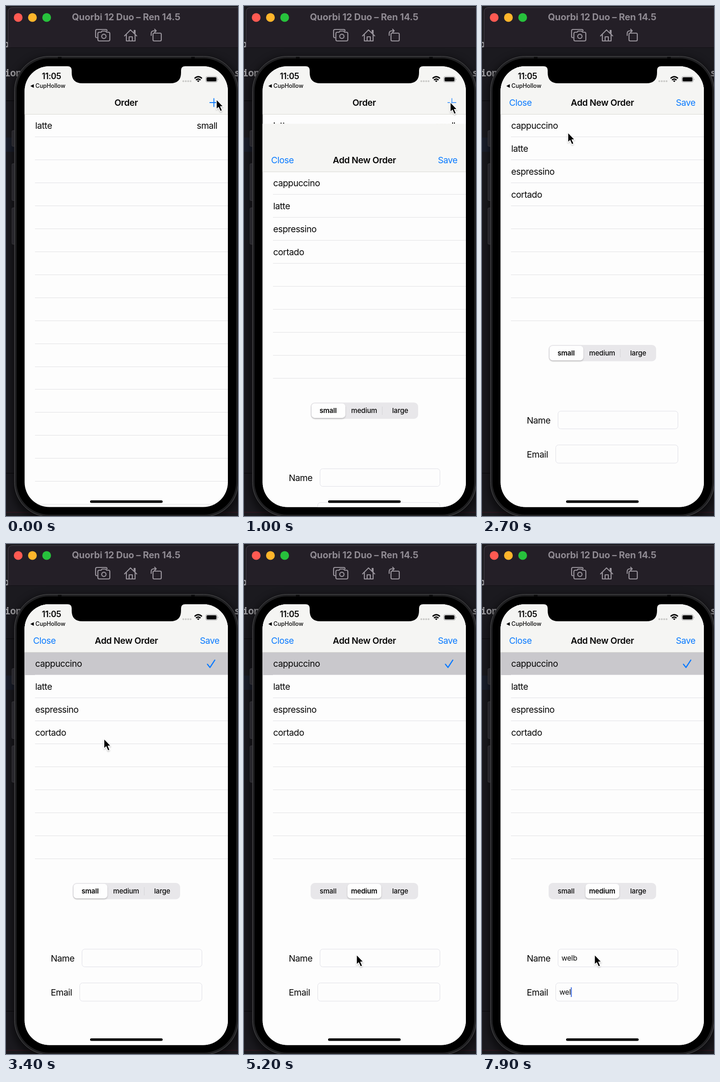
An HTML page for the animation above (8000 ms loop, 505 by 1109 pixels).

```html
<!DOCTYPE html>
<html lang="en">
<head>
<meta charset="utf-8">
<title>Order form</title>
<style>
html, body { margin: 0; width: 100%; height: 100%; overflow: hidden; background: #1b1a1f; }
svg { display: block; width: 505px; height: 1109px; }
text { font: 400 19.3px Inter, sans-serif; letter-spacing: -.5px; fill: #060606; }
.bold { font-weight: 600; letter-spacing: -.4px; }
.mid { text-anchor: middle; }
.end { text-anchor: end; }
.blue { fill: #0a7aff; }
.code { font: 600 21px "Noto Sans Mono", monospace; fill: #9a999d; }
.title { font: 700 20px Inter, sans-serif; letter-spacing: -.1px; fill: #8f8a92; }
.time { font-size: 18px; }
.back { font-size: 12.5px; font-weight: 500; letter-spacing: 0; }
.seg { font-size: 15px; font-weight: 500; letter-spacing: -.2px; }
.seg.on { font-weight: 600; }
.input { font-size: 15.7px; letter-spacing: -.2px; }
.rule { stroke: #e1e1e4; stroke-width: 1; }
.field { fill: #fdfdfd; stroke: #dfdfe6; stroke-width: 1; }
.icon { fill: none; stroke: #99949c; stroke-width: 2.2; stroke-linejoin: round; stroke-linecap: round; }
</style>
</head>
<body>
<svg viewBox="0 0 505 1109">
  <defs>
    <clipPath id="screen"><rect x="40.5" y="131" width="442.5" height="958.5" rx="54"/></clipPath>
    <filter id="soft" x="-30%" y="-30%" width="160%" height="160%">
      <feDropShadow dx="0" dy="2" stdDeviation="1.6" flood-opacity=".22"/>
    </filter>
    <filter id="blur"><feGaussianBlur stdDeviation="9"/></filter>
  </defs>

  <!-- desktop -->
  <rect width="505" height="1109" fill="#1b1a1f"/>
  <path d="M0 206H505M0 1016H505" stroke="#111014" stroke-width="2"/>
  <rect y="286" width="18" height="31" fill="#1b1f2c"/>
  <path d="M0 1101H505" stroke="#2d1820" stroke-width="2"/>
  <text class="code" x="-6" y="90">p:</text>
  <text class="code" x="-3" y="153">ion</text>
  <text class="code" x="497" y="153">si</text>
  <rect x="14" y="112" width="496" height="1010" rx="76" fill="#000" opacity=".55" filter="url(#blur)"/>

  <!-- window bar -->
  <path d="M4 91V13Q4 3.500 14 3.500H505V91Z" fill="#241f27"/>
  <path d="M4.500 90V13Q4.500 3.500 14 3.500H505" fill="none" stroke="#49444d"/>
  <path d="M4 90.500H505" stroke="#121014"/>
  <circle cx="26.500" cy="25" r="9.500" fill="#ff5a52"/>
  <circle cx="57.500" cy="25" r="9.500" fill="#ffb52b"/>
  <circle cx="88.500" cy="25" r="9.500" fill="#27c13c"/>
  <text class="title mid" x="261.500" y="31">Quorbi 12 Duo – Ren 14.5</text>
  <g class="icon">
    <path d="M198 69Q195 69 195 66V54Q195 51 198 51H217Q220 51 220 54"/>
    <path d="M203 57H207L209 54.500H217L219 57H223Q226 57 226 60V73Q226 76 223 76H203Q200 76 200 73V60Q200 57 203 57Z"/>
    <circle cx="213" cy="66" r="4.700"/>
    <path d="M258 65L271 52L284.500 65M262 62V76H281V62M279 58V53H281V60M268 76V67H275V76"/>
    <rect x="320" y="59" width="18" height="17" rx="2.500"/>
    <path d="M316 64V60Q316 54 322 54H327M323.500 50.500L327 54L323.500 57.500"/>
  </g>

  <!-- phone -->
  <g fill="#26252a" stroke="#3a393e">
    <rect x="13" y="271" width="8" height="34" rx="2"/>
    <rect x="13" y="343" width="8" height="80" rx="2"/>
    <rect x="13" y="439" width="8" height="79" rx="2"/>
  </g>
  <rect x="18.500" y="109.500" width="487" height="1001" rx="75" fill="#1f1f21" stroke="#535355"/>
  <path d="M113 112H121M403 112H411" stroke="#0c0c0d" stroke-width="4"/>
  <rect x="23" y="114" width="478" height="992" rx="71"/>

  <g clip-path="url(#screen)">
    <rect x="40" y="131" width="444" height="960" fill="#fdfdfd"/>
    <g id="orders">
      <rect x="40" y="131" width="444" height="104" fill="#f5f5f3"/>
      <path d="M40 235.500H484" stroke="#d9d9d4"/>
      <text class="bold mid" x="261.500" y="217">Order</text>
      <path id="plus" d="M443 210H462M452.500 200.500V219.500" stroke="#0a7aff" stroke-width="1.900"/>
      <text x="63.500" y="267">latte</text>
      <text class="end" x="460" y="267">small</text>
    </g>
    <g id="sheet">
      <rect x="40" y="131" width="444" height="960" fill="#fdfdfd"/>
      <rect x="40" y="131" width="444" height="104" fill="#f5f5f3"/>
      <path d="M40 235.500H484" stroke="#d9d9d4"/>
      <text class="blue" x="59" y="217">Close</text>
      <text class="bold mid" x="262" y="217">Add New Order</text>
      <text class="blue end" x="464.500" y="217">Save</text>
      <g id="picked">
        <rect x="40" y="236" width="444" height="49" fill="#c9c8cc"/>
        <path d="M438.500 261.500L444 268.500L454.500 252.500" fill="none" stroke="#0a7aff" stroke-width="2.400" stroke-linecap="round" stroke-linejoin="round"/>
      </g>
      <rect x="145" y="737" width="234" height="35.500" rx="9" fill="#e8e7ea"/>
      <path id="divider" d="M301 746V764" stroke="#d2d2d6"/>
      <rect id="thumb" x="147" y="739" width="73.500" height="31.500" rx="7" fill="#fefefe" filter="url(#soft)"/>
      <text x="97.500" y="908">Name</text>
      <text x="97.500" y="982">Email</text>
      <rect class="field" x="165.500" y="881" width="261" height="38.500" rx="6"/>
      <rect class="field" x="160.500" y="954.500" width="266" height="39.500" rx="6"/>
      <text class="input" id="name" x="173" y="906"></text>
      <text class="input" id="email" x="168.500" y="980"></text>
      <rect id="caret" width="2" height="21" fill="#3b6ae0"/>
    </g>

    <!-- status bar -->
    <text class="bold time mid" x="99" y="158.500">11:05</text>
    <path d="M53 174L60.500 170V178Z"/>
    <text class="back" x="64" y="178.300">CupHollow</text>
    <g fill="#c8c8c6">
      <circle cx="386" cy="163.500" r="2"/><circle cx="391.300" cy="163.500" r="2"/>
      <circle cx="396.500" cy="163.500" r="2"/><circle cx="401.700" cy="163.500" r="2"/>
    </g>
    <g fill="none" stroke="#050505" stroke-width="2.700">
      <path d="M410.500 157.500Q418.500 150 426.500 157.500M413.500 161Q418.500 156.500 423.500 161"/>
      <path d="M418.500 165.500L415.800 162.700Q418.500 160.700 421.200 162.700Z" fill="#050505" stroke="none"/>
    </g>
    <rect x="434.800" y="153.300" width="25" height="12.400" rx="3.800" fill="none" stroke="#98989a"/>
    <rect x="436.500" y="155" width="21.600" height="9" rx="2.300"/>
    <path d="M461.200 157.500Q463 159.500 461.200 161.500Z" fill="#98989a"/>
    <rect x="183" y="1075" width="158" height="5.500" rx="2.750"/>
  </g>
  <path d="M134 129V131Q143 131 143 140V145Q143 168 166 168H358Q381 168 381 145V140Q381 131 390 131V129Z"/>

  <path id="cursor" d="M0 0V21.500L4.700 17.200L8.600 26L12.600 24.300L8.800 15.700H15Z" stroke="#fff" stroke-width="1.400" stroke-linejoin="round" filter="url(#soft)"/>
</svg>
<script>
const LOOP = 8000, STEP = 100;
const TAP = { plus: 760, row: 2900, medium: 3990, name: 5400, email: 7100 };
const KEYS = {
  name: { word: "welb", times: [6000, 6200, 6400, 6600], x: 173, y: 890 },
  email: { word: "wel", times: [7500, 7700, 7800], x: 168.5, y: 964 }
};
// time, x, y of the pointer
const ROUTE = [
  [0, 458, 203], [100, 458, 203], [400, 449, 209], [1500, 449, 209],
  [2500, 187, 275], [3100, 187, 275], [3900, 270, 744], [4400, 270, 744],
  [5000, 245, 893], [LOOP, 245, 893]
];

const $ = id => document.getElementById(id);
function add(parent, tag, attrs, label) {
  const el = document.createElementNS("http://www.w3.org/2000/svg", tag);
  for (const k in attrs) el.setAttribute(k, attrs[k]);
  if (label) el.textContent = label;
  return parent.appendChild(el);
}
function rules(parent, count) {
  for (let i = 0; i < count; i++) {
    const y = Math.round(284 + i * 49.95) + 0.5;
    add(parent, "path", { class: "rule", d: `M63 ${y}H484` });
  }
}

rules($("orders"), 17);
rules($("sheet"), 9);
["cappuccino", "latte", "espressino", "cortado"].forEach((drink, i) =>
  add($("sheet"), "text", { x: 63.5, y: 267 + i * 50 }, drink));
const sizes = ["small", "medium", "large"].map((size, i) =>
  add($("sheet"), "text", { class: "seg mid", x: 183 + i * 78.5, y: 760.3 }, size));

const clamp = v => Math.min(1, Math.max(0, v));
const ease = v => v * v * (3 - 2 * v);
// share of the distance left in a critically damped spring
function left(ms, rate) {
  const x = Math.max(0, ms) / 1000 * rate;
  return (1 + x) * Math.exp(-x);
}
function pointer(t) {
  const i = ROUTE.findIndex((p, n) => n && t <= p[0]);
  const [t0, x0, y0] = ROUTE[i - 1], [t1, x1, y1] = ROUTE[i];
  const k = ease((t - t0) / (t1 - t0));
  return [x0 + (x1 - x0) * k, y0 + (y1 - y0) * k];
}
function type(id, t) {
  const { word, times } = KEYS[id];
  $(id).textContent = word.slice(0, times.filter(s => s <= t).length);
}
function drawCaret(t) {
  const id = t >= TAP.email ? "email" : "name";
  const { times, x, y } = KEYS[id];
  const last = [TAP[id], ...times].filter(s => s <= t).pop();
  const shown = t >= TAP.name && (t - last) % 1000 < 600;
  $("caret").style.display = shown ? "" : "none";
  const width = $(id).textContent ? $(id).getComputedTextLength() : 0;
  $("caret").setAttribute("x", x + width);
  $("caret").setAttribute("y", y);
}

function render(t) {
  $("sheet").setAttribute("transform", `translate(0 ${959 * left(t - TAP.plus, 14.8)})`);
  const dim = t < 600 ? 0 : 1 - clamp((t - TAP.plus) / 450);
  $("plus").style.opacity = 1 - 0.7 * dim;

  $("picked").style.display = t >= TAP.row ? "" : "none";
  const medium = t >= TAP.medium;
  $("thumb").setAttribute("x", 147 + 78.3 * (1 - left(t - TAP.medium, 17)));
  $("divider").style.display = medium ? "none" : "";
  sizes.forEach((el, i) => el.classList.toggle("on", i === +medium));

  type("name", t);
  type("email", t);
  drawCaret(t);
  $("cursor").setAttribute("transform", `translate(${pointer(t)})`);
}

const start = performance.now();
function tick(now) {
  const t = Math.max(0, now - start) % LOOP;
  render(Math.floor(t / STEP) * STEP);
  requestAnimationFrame(tick);
}
render(0);
requestAnimationFrame(tick);
</script>
</body>
</html>
```
